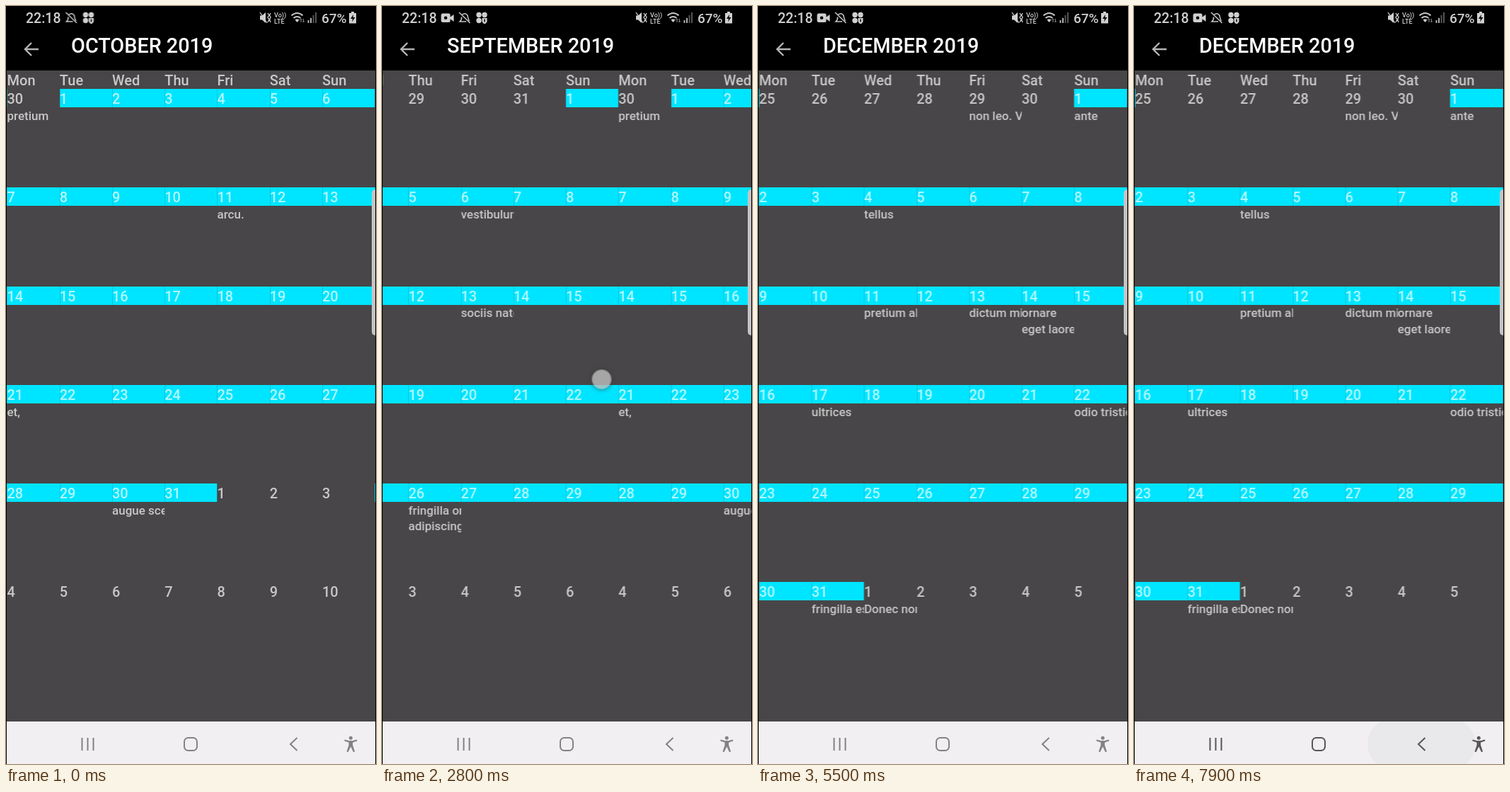
Write an HTML page that moves like this. It is 523 by 1070 pixels and loops after 8 s.

```html
<!DOCTYPE html>
<html lang="en">
<head>
<meta charset="utf-8">
<title>Calendar</title>
<style>
  html, body { margin: 0; width: 100%; height: 100%; overflow: hidden; background: #000; }
  body { position: relative; font: 500 20px Roboto, sans-serif; color: rgba(255,255,255,.7); }
  div, svg { position: absolute; white-space: nowrap; }
  svg { left: 0; top: 0; width: 523px; height: 1070px; }
  .run, .run * { animation: 8s step-end infinite; }

  #calendar { left: 1px; top: 91px; width: 520.5px; height: 919px; background: #484648; overflow: hidden; }
  #strip { left: .5px; top: 0; animation-name: swipe; }
  .page { top: 0; width: 519.75px; height: 919px; }
  .name, .day, .event { width: 74.25px; }
  .name { top: 1px; line-height: 27px; }
  .day { height: 26px; line-height: 28px; }
  .in { background: #00e5ff; }
  .event { font-size: 17px; line-height: 22.5px; height: 22.5px; overflow: hidden; }

  #header { left: 1px; top: 34px; width: 520.5px; height: 57px; background: #000; }
  #window { left: 91px; top: 2px; width: 400px; height: 40px; overflow: hidden; }
  #titles { top: 0; left: 0; font-size: 28.8px; line-height: 40px; color: #fff; white-space: pre; animation-name: title; }

  #detail { left: 1px; top: 34px; width: 520.5px; height: 976px; background: #424242; opacity: 0; animation-name: detail; }
  #bar { left: 0; top: 0; width: 100%; height: 67px; background: #000; }
  #bar div { left: 91px; top: 0; font-size: 25.3px; line-height: 38px; color: #fff; }
  #card { left: 5px; top: 142px; width: 511px; height: 190px; border-radius: 42px; background: #262626; }
  #card div { line-height: 28px; }
  #card .head { left: 0; width: 100%; text-align: center; font-size: 25.3px; top: 4px; }
  #card .line { font-weight: 400; font-size: 20.2px; left: 10px; }
  #card .time { left: 274px; }

  #nav { left: 1px; top: 1009.5px; width: 520.5px; height: 61px; background: #f1eff2; overflow: hidden; animation-name: nav; }
  #ripple { left: 329px; top: -4px; width: 153px; height: 72px; border-radius: 42px; background: #e9e8ea; opacity: 0; animation-name: ripple; }
  #handle { left: 516.5px; top: 259px; width: 5px; height: 206px; border-radius: 5px 0 0 5px; background: #c6c5c6; }
  #keys { color: #828183; animation-name: keys; }
  #video { animation-name: video; }
  #notes { animation-name: notes; }
  #dot { left: -13px; top: -13px; width: 26px; height: 26px; border-radius: 50%; opacity: 0;
    background: rgba(190,190,190,.8); box-shadow: 0 0 0 1px rgba(215,215,215,.5), 0 0 5px 3px rgba(60,60,60,.4); animation-name: touch; }

  @keyframes swipe {
    0% { transform: translateX(-519.75px) }
    6.25% { transform: translateX(-430px) }
    7.5% { transform: translateX(-240px) }
    8.75% { transform: translateX(-100px) }
    10% { transform: translateX(-35px) }
    11.25% { transform: translateX(-11px) }
    12.5% { transform: translateX(-2px) }
    16.25% { transform: translateX(0) }
    35% { transform: translateX(-187px) }
    36.25% { transform: translateX(-400px) }
    37.5% { transform: translateX(-500px) }
    38.75% { transform: translateX(-519.75px) }
    43.75% { transform: translateX(-560px) }
    45% { transform: translateX(-700px) }
    46.25% { transform: translateX(-850px) }
    47.5% { transform: translateX(-953px) }
    48.75% { transform: translateX(-1010px) }
    50% { transform: translateX(-1034px) }
    53.75% { transform: translateX(-1038.5px) }
    55% { transform: translateX(-1039.5px) }
    58.75% { transform: translateX(-1080px) }
    60% { transform: translateX(-1220px) }
    61.25% { transform: translateX(-1370px) }
    62.5% { transform: translateX(-1473px) }
    63.75% { transform: translateX(-1530px) }
    65% { transform: translateX(-1556px) }
    68.75%, 100% { transform: translateX(-1559.25px) }
  }
  @keyframes title {
    0% { transform: translateY(-40px) }
    16.25% { transform: none }
    38.75% { transform: translateY(-40px) }
    53.75% { transform: translateY(-80px) }
    68.75%, 100% { transform: translateY(-120px) }
  }
  @keyframes detail {
    0% { opacity: 0 }
    82.5% { opacity: .05 }
    83.75% { opacity: .2 }
    85% { opacity: .45 }
    86.25% { opacity: .7 }
    87.5% { opacity: .9 }
    88.75% { opacity: 1 }
    95% { opacity: .8 }
    96.25% { opacity: .45 }
    97.5% { opacity: .12 }
    98.75%, 100% { opacity: 0 }
  }
  @keyframes touch {
    0% { opacity: 0 }
    6.25% { opacity: 1; transform: translate(240px, 527px) }
    7.5% { opacity: 1; transform: translate(400px, 527px) }
    8.75% { opacity: 0 }
    35% { opacity: 1; transform: translate(310.5px, 527px) }
    36.25% { opacity: 0 }
    43.75%, 58.75% { opacity: 1; transform: translate(440px, 527px) }
    45%, 60% { opacity: 1; transform: translate(300px, 527px) }
    46.25%, 61.25% { opacity: 0 }
    80% { opacity: 1; transform: translate(325px, 440px) }
    82.5%, 100% { opacity: 0 }
  }
  @keyframes nav { 0%, 97.5%, 100% { background: #f1eff2 } 83.75% { background: #e9e8ea } }
  @keyframes ripple {
    0% { opacity: 0 }
    93.75% { opacity: 1; transform: scale(.4) }
    95% { opacity: 1; transform: scale(.8) }
    96.25%, 100% { opacity: 1; transform: none }
  }
  @keyframes keys { 0% { color: #828183 } 93.75%, 100% { color: #565557 } }
  @keyframes video { 0% { opacity: 0 } 8.75%, 100% { opacity: 1 } }
  @keyframes notes { 0% { transform: translateX(-24.5px) } 8.75%, 100% { transform: none } }
</style>
</head>
<body class="run">
<div id="calendar"><div id="strip"></div></div>

<div id="header">
  <div id="window"><div id="titles"></div></div>
  <svg style="left:-1px;top:-34px"><path id="back" d="M46 61H27.500M36 52l-9 9 9 9" fill="none" stroke="#b4b4b4" stroke-width="2.400"/></svg>
</div>

<div id="detail">
  <div id="bar"><div>FRIDAY 13 DECEMBER 2019</div></div>
  <div id="card">
    <div class="head">augue scelerisque mollis. Phasellus</div>
    <div class="line" style="top:44px">2748 Solvarium Avenue</div>
    <div class="line" style="top:80px">30/10/2019</div>
    <div class="line time" style="top:80px">01:34</div>
    <div class="line" style="top:116px">30/10/2019</div>
    <div class="line time" style="top:116px">07:34</div>
  </div>
  <svg style="left:-1px;top:-34px">
    <use href="#back" y="3.500" x=".5"/>
    <path d="M479 326h5l1-2h6l1 2h5v2.500h-18z" fill="#c4c4c4"/>
    <path d="M480 330h16v15q0 2-2 2h-12q-2 0-2-2z" fill="#c4c4c4"/>
    <path d="M485 335.500l6 6m0-6l-6 6" stroke="#262626" stroke-width="2"/>
  </svg>
</div>

<div id="nav"><div id="ripple"></div></div>
<div id="handle"></div>

<svg viewBox="0 0 523 1070" font-family="Roboto, sans-serif" font-weight="500" fill="#d0d0d0">
  <text x="28" y="23.500" font-size="19.500">22:18</text>
  <g id="video">
    <rect x="83.500" y="10.500" width="13" height="12.500" rx="2.500"/>
    <path d="M96 16l5.500-4v10l-5.500-4z"/>
    <circle cx="90" cy="16.800" r="2.300" fill="#000"/>
  </g>
  <g id="notes">
    <path d="M113 12.500q5-4 8 1 .500 5 2.500 7.500M119 22h-9q3-3 2.500-6.500M109 9l15.500 15" fill="none" stroke="#c4c4c4" stroke-width="1.600"/>
    <circle cx="137" cy="12.500" r="3.700"/><circle cx="145" cy="12.500" r="3.700"/><circle cx="137" cy="20.500" r="3.700"/>
    <path d="M141.500 17h7v5q-1 2.500-3.500 3.500-2.500-1-3.500-3.500z"/>
    <path d="M145 18.500v4" stroke="#000" stroke-width="1.500"/>
  </g>
  <path d="M359 13.500h3l5-4.500v15l-5-4.500h-3z"/>
  <path d="M359 9l10 15M370 10l2 3-2 3 2 3-2 4M374 10l-1.500 3 1.500 3-1.500 3 1.500 4" fill="none" stroke="#d0d0d0" stroke-width="1.300"/>
  <text x="379" y="15.500" font-size="9">Vo))</text>
  <text x="379" y="24.500" font-size="9">LTE</text>
  <g fill="none" stroke="#c4c4c4" stroke-width="1.800">
    <path d="M403.500 13.500q8-7 16 0M406.500 17q5-4 10 0"/>
  </g>
  <path d="M408.500 19.500q3-2 6 0l-3 3.500z"/>
  <path d="M417 23v-5m-1.500 1.500l1.500-1.500 1.500 1.500M420.500 18v5m-1.500-1.500l1.500 1.500 1.500-1.500" fill="none" stroke="#888"/>
  <path d="M427.500 24v-4M431 24v-7" stroke="#b0b0b0" stroke-width="2"/>
  <path d="M434.500 24v-11M438 24v-15" stroke="#555" stroke-width="2"/>
  <text x="446" y="23.500" font-size="19">67%</text>
  <path d="M488 8h4v2h3v14.500h-10v-14.500h3z"/>
  <path d="M491 12l-4 6h3l-1 4.500 4.500-6.500h-3z" fill="#000"/>
  <g id="keys" fill="none" stroke="currentColor" stroke-width="2">
    <path d="M107.500 1033v18M115.500 1033v18M123.500 1033v18M411.500 1033l-9.500 9 9.500 9"/>
    <rect x="252" y="1033" width="18" height="18" rx="5.500"/>
    <circle cx="487.300" cy="1033.200" r="2.500" fill="currentColor" stroke="none"/>
    <path d="M478.500 1036.500l6 1.800h5.600l6-1.800" stroke-width="2.200"/>
    <path d="M484.500 1037.500h5.600v6l3 9-2 .8-3.800-7.800-3.800 7.800-2-.8 3-9z" fill="currentColor" stroke="none"/>
  </g>
</svg>
<div id="dot"></div>

<script>
  const CELL = 74.25, ROW = 139.25, YEAR = 2019;
  const WEEK = ["Mon", "Tue", "Wed", "Thu", "Fri", "Sat", "Sun"];
  const MONTHS = { 9: "SEPTEMBER", 10: "OCTOBER", 11: "NOVEMBER", 12: "DECEMBER" };
  const EVENTS = {
    "9/2": ["tempus risus"], "9/4": ["aa", "aaa"], "9/6": ["vestibulum"], "9/13": ["sociis natoque"],
    "9/26": ["fringilla ornare", "adipiscing"], "9/30": ["pretium"],
    "10/11": ["arcu."], "10/21": ["et,"], "10/30": ["augue scelerisque"],
    "11/14": ["tincidunt aliquet"], "11/18": ["sit amet ultricies"], "11/29": ["non leo. Vivamus"],
    "12/1": ["ante"], "12/4": ["tellus"], "12/11": ["pretium aliquet"], "12/13": ["dictum mi"],
    "12/14": ["ornare", "eget laoreet"], "12/17": ["ultrices"], "12/22": ["odio tristique"],
    "12/31": ["fringilla est"], "1/1": ["Donec non"]
  };

  function add(parent, cls, text, x, y) {
    const el = document.createElement("div");
    el.className = cls;
    el.textContent = text;
    el.style.left = x + "px";
    if (y !== undefined) el.style.top = y + "px";
    parent.append(el);
    return el;
  }

  function addMonth(month, index) {
    const page = add(strip, "page", "", index * CELL * 7);
    const lead = (new Date(YEAR, month - 1, 1).getDay() + 6) % 7;
    WEEK.forEach((name, col) => add(page, "name", name, col * CELL));
    for (let i = 0; i < 42; i++) {
      const date = new Date(YEAR, month - 1, 1 - lead + i);
      const m = date.getMonth() + 1, d = date.getDate();
      const x = i % 7 * CELL, y = 26.2 + Math.floor(i / 7) * ROW;
      add(page, m === month ? "day in" : "day", d, x, y);
      (EVENTS[m + "/" + d] || []).forEach((text, n) => add(page, "event", text, x, y + 26.6 + n * 22.5));
    }
  }

  const strip = document.getElementById("strip");
  Object.keys(MONTHS).forEach((month, index) => addMonth(+month, index));
  document.getElementById("titles").textContent =
    Object.values(MONTHS).map(name => name + " " + YEAR).join("\n");
</script>
</body>
</html>
```
